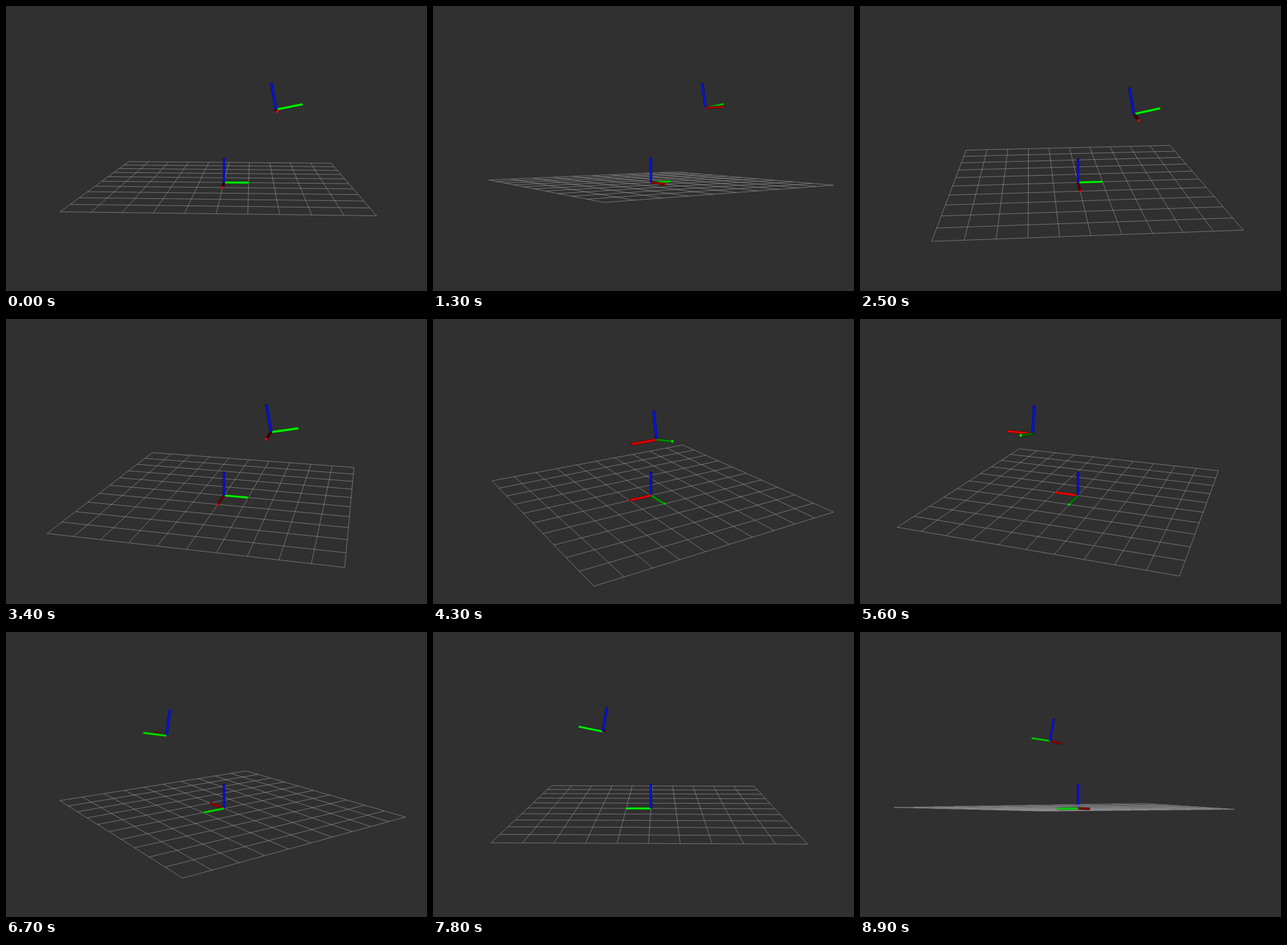
These frames come from a looping animation (636 px wide and 430 px high, 9 s). An HTML page with a canvas:

```html
<!DOCTYPE html>
<html lang="en">
<head>
<meta charset="utf-8">
<title>Orbiting coordinate frames</title>
<style>
html, body { margin: 0; width: 100%; height: 100%; overflow: hidden; background: #303030; }
canvas { display: block; }
</style>
</head>
<body>
<canvas id="stage" width="636" height="430"></canvas>
<script>
const ctx = document.getElementById('stage').getContext('2d');
const LOOP = 9000, STEP = 100;
const CX = 329.3, CY = 266.2, FOCAL = 831, DIST = 22.25;
const RADIUS = 0.05, ROLL = 0.2;

// Camera orbit: time in ms, yaw and pitch in degrees
const ORBIT = [
  [0, 2.85, 11.4], [200, 5, 11.4], [1000, -34, 5.2], [1150, -36, 4.6],
  [1300, -34.3, 4.6], [2000, -22, 15.3], [2500, -4.76, 19.9],
  [3000, 9.5, 20.9], [3100, 9.5, 20.9], [4100, 44, 21.5],
  [4300, 58.5, 22.4], [5100, 82, 22.3], [5600, 109.8, 21.9],
  [6100, 110.5, 21.8], [6300, 120, 21.4], [6700, 144.5, 16.4],
  [7100, 148, 15.7], [8100, 194, 10.8], [8900, 210.1, -1.17]
];

const BODY = [
  { color: [255, 0, 0], dir: [1, 0, 0] },
  { color: [0, 250, 0], dir: [0, 1, 0] },
  { color: [8, 20, 232], dir: [0, 0, 1] }
];
const rollX = ([x, y, z]) => [
  x,
  y * Math.cos(ROLL) - z * Math.sin(ROLL),
  y * Math.sin(ROLL) + z * Math.cos(ROLL)
];
const makeFrame = (origin, turn) =>
  BODY.map(b => ({ color: b.color, from: origin, dir: turn(b.dir) }));
const baseAxes = makeFrame([0, 0, 0], d => d);
const childAxes = makeFrame([1, 2, 3], rollX);

// Monotone cubic interpolation of one column of the orbit table
function sample(t, col) {
  const n = ORBIT.length - 1;
  let i = 0;
  while (i < n - 1 && t >= ORBIT[i + 1][0]) i++;
  const rise = k => (ORBIT[k + 1][col] - ORBIT[k][col]) / (ORBIT[k + 1][0] - ORBIT[k][0]);
  const slope = k => {
    if (k === 0) return rise(0);
    if (k === n) return rise(n - 1);
    const a = rise(k - 1), b = rise(k);
    return a * b <= 0 ? 0 : 2 * a * b / (a + b);
  };
  const [t0, t1] = [ORBIT[i][0], ORBIT[i + 1][0]];
  const h = t1 - t0, s = Math.min(1, (t - t0) / h), r = 1 - s;
  return r * r * (1 + 2 * s) * ORBIT[i][col] + s * s * (3 - 2 * s) * ORBIT[i + 1][col]
    + h * s * r * (r * slope(i) - s * slope(i + 1));
}

function makeCamera(yaw, pitch) {
  const C = Math.cos(yaw), S = Math.sin(yaw);
  const c = Math.cos(pitch), s = Math.sin(pitch);
  const project = ([x, y, z]) => {
    const u = x * C + y * S, v = y * C - x * S;
    const depth = DIST - u * c - z * s;
    const scale = FOCAL / depth;
    return { x: CX + v * scale, y: CY + (u * s - z * c) * scale, depth, scale };
  };
  return { project, below: pitch < 0, eye: [DIST * C * c, DIST * S * c, DIST * s] };
}

function line(a, b) {
  ctx.beginPath();
  ctx.moveTo(a.x, a.y);
  ctx.lineTo(b.x, b.y);
  ctx.stroke();
}

function drawGrid(cam) {
  ctx.lineWidth = 1;
  ctx.strokeStyle = 'rgba(160,160,164,.56)';
  for (let k = -5; k <= 5; k++) {
    line(cam.project([k, -5, 0]), cam.project([k, 5, 0]));
    line(cam.project([-5, k, 0]), cam.project([5, k, 0]));
  }
}

const shade = (color, f) => `rgb(${color.map(c => Math.round(c * f)).join()})`;

// A lit cylinder: darker rim, bright core, and the end cap that faces the eye
function drawAxis(cam, { color, from, dir }) {
  const tip = from.map((p, i) => p + dir[i]);
  const a = cam.project(from), b = cam.project(tip);
  const view = cam.eye.map((e, i) => e - from[i] - dir[i] / 2);
  const facing = dir.reduce((sum, d, i) => sum + d * view[i], 0) / Math.hypot(...view);
  const side = Math.sqrt(Math.max(0, 1 - facing * facing));
  const width = RADIUS * (a.scale + b.scale);
  ctx.lineCap = 'butt';
  ctx.strokeStyle = shade(color, side * 0.5);
  ctx.lineWidth = width;
  line(a, b);
  ctx.strokeStyle = shade(color, side);
  ctx.lineWidth = width * 0.64;
  line(a, b);

  const end = facing > 0 ? b : a, r = RADIUS * end.scale;
  ctx.fillStyle = shade(color, Math.abs(facing));
  ctx.beginPath();
  ctx.ellipse(end.x, end.y, r * Math.abs(facing), r,
    Math.atan2(b.y - a.y, b.x - a.x), 0, 2 * Math.PI);
  ctx.fill();
}

function drawAxes(cam, axes) {
  const mid = a => cam.project(a.from.map((p, i) => p + a.dir[i] / 2)).depth;
  [...axes].sort((a, b) => mid(b) - mid(a)).forEach(a => drawAxis(cam, a));
}

function draw(t) {
  const rad = Math.PI / 180;
  const cam = makeCamera(sample(t, 1) * rad, sample(t, 2) * rad);
  ctx.fillStyle = '#303030';
  ctx.fillRect(0, 0, 636, 430);
  if (cam.below) {
    // Seen from underneath, the grid covers the foot of the upright axis
    drawAxis(cam, baseAxes[2]);
    drawGrid(cam);
    drawAxes(cam, baseAxes.slice(0, 2));
  } else {
    drawGrid(cam);
    drawAxes(cam, baseAxes);
  }
  drawAxes(cam, childAxes);
}

const start = performance.now();
function tick() {
  const t = (performance.now() - start) % LOOP;
  draw(Math.floor(t / STEP) * STEP);
  requestAnimationFrame(tick);
}
tick();
</script>
</body>
</html>
```
